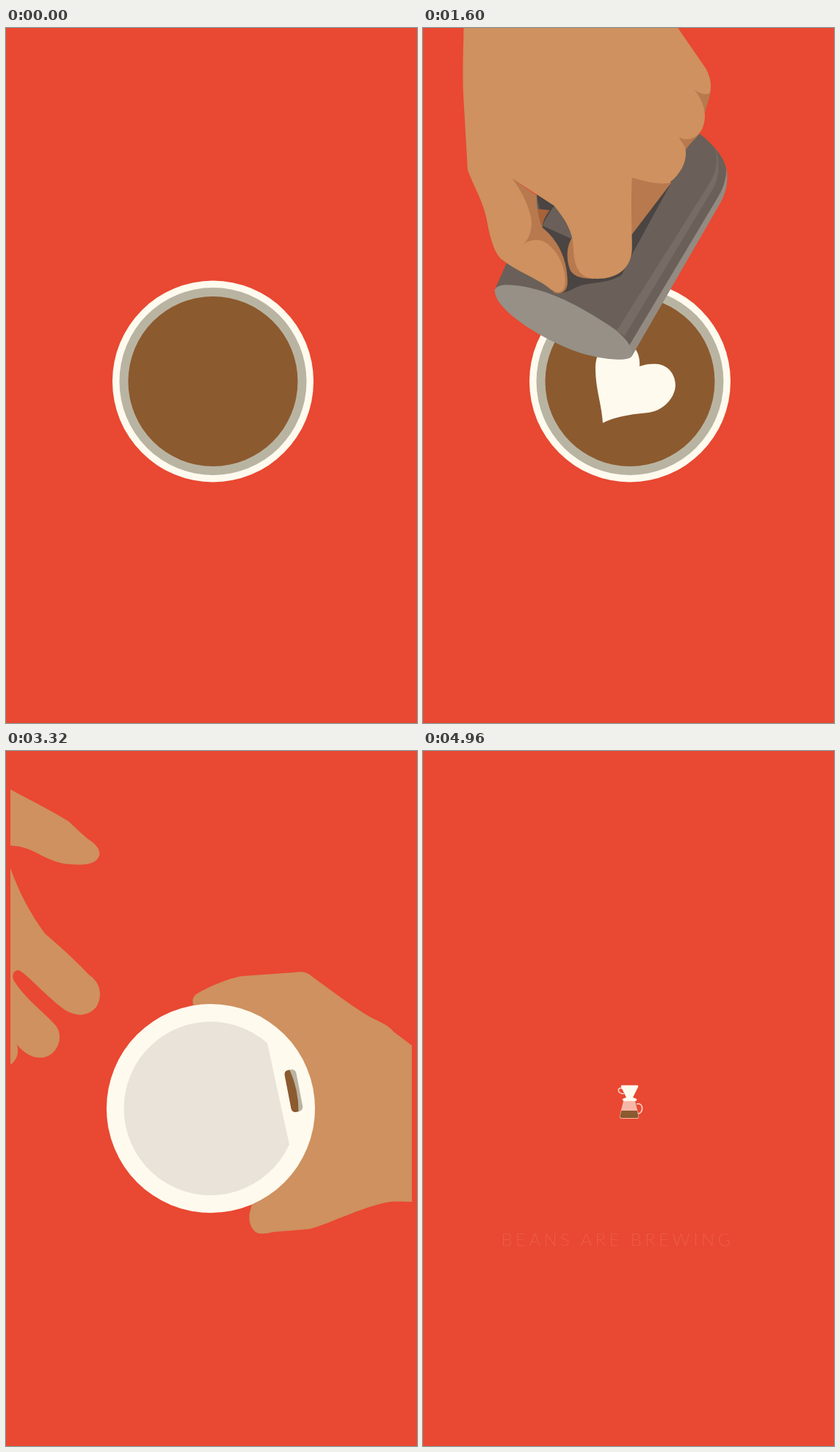
Write an HTML page that moves like this. It is 560 by 945 pixels and loops after 5000 ms.

```html
<!DOCTYPE html>
<html lang="en">
<head>
<meta charset="utf-8">
<title>Coffee loop</title>
<style>
html, body { margin: 0; width: 100%; height: 100%; overflow: hidden; background: #e94832; }
svg { display: block; width: 100%; height: 100%; }
.skin { fill: #ce915f; }
.shade { fill: #b7794d; }
.dark { fill: #4a4442; }
.steel { fill: #6a6059; }
.cream { fill: #fefaee; }
.coffee { fill: #8c5a2f; }
.ring { fill: #b9b4a2; }
</style>
</head>
<body>
<svg viewBox="0 0 560 945" preserveAspectRatio="none">
  <defs>
    <clipPath id="frame"><rect x="6" y="0" width="547" height="945"/></clipPath>
    <clipPath id="lip"><path id="lipShape" d="M227 358C231 349 250 351 268 354C310 362 350 385 385 408C405 422 416 437 414 448C411 455 385 455 350 446C320 437 280 418 250 393C235 380 226 368 227 358Z"/></clipPath>
  </defs>
  <rect width="560" height="945" fill="#e94832"/>

  <g id="cup">
    <circle class="cream" cx="282" cy="480.5" r="137"/>
    <circle class="ring" cx="282" cy="480.5" r="127.5"/>
    <circle class="coffee" cx="282" cy="480.5" r="115.5"/>
    <path id="milk" class="cream"/>
  </g>

  <g id="jug">
    <path class="steel" d="M227 358L243 322L285 228L400 190L506 146C530 165 546 185 543 208C542 222 537 234 530 246L414 448Z"/>
    <path fill="#766c65" d="M526 163C533 185 528 200 518 216L393 414L404 421L526 218C534 200 534 178 526 163Z"/>
    <path fill="#938b82" d="M543 192C542 212 537 222 530 234L409 436L414 448L531 246C543 227 545 212 543 192Z"/>
    <use href="#lipShape" fill="#969086"/>
    <path class="dark" d="M284 228L312 243L345 300L414 260L470 208L414 310L400 338C385 348 365 348 350 351C336 353 328 364 312 362L320 335L292 272Z"/>
    <path class="steel" d="M309 243L338 292L292 271C297 260 302 252 309 243Z"/>
    <path fill="#a8623a" d="M284 248L302 250C296 257 293 264 291 275Z"/>
    <path class="shade" d="M251 207L284 230C284 250 288 265 292 274C313 290 327 318 326 350C325 362 315 365 308 362L265 298Z"/>
    <path class="shade" d="M335 284C325 295 323 315 330 332C336 342 350 343 362 343L350 290Z"/>
    <path class="shade" d="M410 205C430 209 445 213 468 212L410 288Z"/>
    <path class="shade" d="M495 86L521 84C521 96 516 106 513 118L500 110Z"/>
    <path class="shade" d="M475 151L506 146C500 153 493 159 487 168Z"/>
    <path class="skin" d="M150 -700L184 -85C188 -50 182 40 184 90L190 195C198 218 212 238 217 268C222 295 229 312 238 318C255 332 285 343 300 355C310 364 323 366 323 345C322 320 308 300 293 292C284 289 272 290 265 298C273 290 278 278 277 265C275 245 262 222 251 207L308 244C322 262 334 280 334 300C335 325 340 340 360 343C396 345 414 328 414 300C414 280 412 240 414 206C425 208 445 216 465 213C480 200 489 185 487 168C486 162 481 157 478 151C486 155 496 155 505 146C512 140 514 125 513 118C512 105 505 94 499 86C508 93 515 93 520 91C523 80 521 70 515 58L475 0L414 -85L350 -180L340 -700Z"/>
    <g id="pourClip"><path id="pour" fill="#fdfbff"/></g>
  </g>

  <g id="hands">
    <g id="right">
      <path class="shade" d="M186 342C187 356 190 366 203 370L216 362Z"/>
      <path class="skin" d="M640 519L553 452L460 382C450 370 435 367 418 356C395 341 365 319 345 304C338 299 331 300 325 301L255 306C240 307 210 319 190 331C184 336 185 345 190 349C198 357 204 361 210 364L300 480L264 626C260 640 267 654 276 656C285 657 290 655 296 654L345 650C370 644 420 618 455 613C480 611 500 616 553 613L640 613Z"/>
    </g>
    <g id="lid">
      <circle class="cream" r="142"/>
      <path fill="#e9e3d9" d="M77 -89L107 49A118 118 0 1 1 77 -89Z"/>
      <g transform="translate(113 -24) rotate(-11)">
        <rect class="ring" x="-8" y="-29" width="16" height="58" rx="6"/>
        <path class="coffee" d="M0 -29Q7 0 1 29H-2Q-8 29 -8 23V-23Q-8 -29 -2 -29Z"/>
      </g>
    </g>
    <g id="left">
      <path class="skin" d="M-60 150L6 179C30 187 42 195 58 206C115 240 215 258 292 274C325 292 352 305 380 322C395 336 402 343 412 350C420 356 424 364 421 370C416 381 400 382 378 380C350 376 340 364 320 358C310 355 300 355 292 354C300 395 322 440 348 475C372 495 395 517 408 531C425 542 426 562 417 575C405 588 390 587 376 579C355 565 328 535 315 526C307 521 301 530 305 538C318 560 340 576 360 597C371 608 370 625 358 637C345 648 325 645 309 625C314 637 308 652 293 656C275 657 258 645 245 630C246 640 240 648 230 647C210 644 190 634 177 624C155 604 125 580 103 563C95 555 90 543 78 525C55 500 25 470 6 437L-60 340Z"/>
      <path class="shade" d="M163 559C185 568 200 580 211 595C195 588 178 574 163 559Z"/>
      <path class="shade" d="M232 564C245 562 255 567 262 574C272 585 282 597 293 609C275 596 252 578 232 564Z"/>
    </g>
  </g>

  <g id="brewer">
    <path d="M272 459C264 456 264 466 274 466M291 480C301 477 301 494 292 493" fill="none" stroke="#f9cfc0" stroke-width="1.7"/>
    <path class="cream" d="M271 454.500H292Q294 455 293 457L286 471L291 473Q292 476 289 476H274Q271 475 272 473L277 471L270 457Q269 455 271 454.500Z"/>
    <path fill="#f7b7a8" d="M273 476H289L294 496Q295 500 291 500H271Q267 500 268 496Z"/>
    <path class="coffee" d="M270.500 489H291.500L293.500 496Q294 499 291 499H271Q268 499 268.500 496Z"/>
  </g>
  <text id="label" x="106.500" y="673" font-family="Lato, 'Open Sans', sans-serif" font-weight="300" font-size="24" letter-spacing="4.4" fill="#ffd9d0">BEANS ARE BREWING</text>
</svg>
<script>
const LOOP = 5000, STEP = 40;
const $ = id => document.getElementById(id);
const mix = (a, b, p) => a + (b - a) * p;
const span = (t, a, b) => Math.min(1, Math.max(0, (t - a) / (b - a)));
const outCubic = p => 1 - (1 - p) ** 3;
const smooth = p => p * p * (3 - 2 * p);
const show = (id, on) => $(id).setAttribute('display', on ? 'inline' : 'none');
const place = (id, x, y, s = 1) => $(id).setAttribute('transform', `translate(${x} ${y}) scale(${s})`);

// heart outline: start point, then seven cubic segments
const heart = [245,537, 243,510, 235,490, 235,463, 235,440, 248,424, 266,424,
  284,424, 297,440, 295,460, 303,457, 312,456, 320,457, 335,459, 344,472, 344,486,
  343,505, 325,521, 307,523, 285,525, 262,528, 245,537];
const angles = [123, 193, 249, 300, 335, 372, 425, 483].map(a => a * Math.PI / 180);

// circle with the same segments as the heart
function disc(cx, cy, r) {
  const at = (a, k) => [cx + r * (Math.cos(a) - k * Math.sin(a)), cy + r * (Math.sin(a) + k * Math.cos(a))];
  const pts = at(angles[0], 0);
  for (let i = 1; i < angles.length; i++) {
    const a = angles[i - 1], b = angles[i], k = 4 / 3 * Math.tan((b - a) / 4);
    pts.push(...at(a, k), ...at(b, -k), ...at(b, 0));
  }
  return pts;
}

function drawMilk(t) {
  const r = t < 680 ? 37.5 * span(t, 480, 680) : mix(37.5, 54, smooth(span(t, 680, 1080)));
  const p = smooth(span(t, 980, 1360));
  const pts = disc(286, 475, r).map((v, i) => mix(v, heart[i], p));
  $('milk').setAttribute('d', `M${pts[0]} ${pts[1]}C${pts.slice(2).join(' ')}Z`);
  show('milk', r > 0);
}

function drawJug(t) {
  const on = t >= 40 && t < 2120;
  show('jug', on);
  if (!on) return;
  let x, y;
  if (t < 700) {
    x = 0;
    y = -460 * (1 - outCubic(span(t, 0, 560)));
  } else if (t < 900) {
    const p = smooth(span(t, 700, 900));
    x = 8 * p;
    y = -6 * p;
  } else if (t < 1280) {
    const p = span(t, 900, 1280) ** 2;
    x = mix(8, -50, p);
    y = mix(-6, 80, p);
  } else {
    const q = span(t, 1280, 2100) ** 2;
    x = -50 - 520 * q;
    y = 80 - 540 * q;
  }
  place('jug', x, y);

  const grow = span(t, 420, 540), left = 1 - span(t, 1280, 1400);
  const tip = [mix(336, 301, grow), mix(383, 448, grow)];
  const a = [mix(336, 305, left), mix(383, 367, left)];
  const b = [mix(336, 368, left), mix(383, 399.5, left)];
  $('pour').setAttribute('d', `M${a}L${b}L${tip}Z`);
  show('pour', grow > 0 && left > 0);
  if (t >= 1240) $('pourClip').setAttribute('clip-path', 'url(#lip)');
  else $('pourClip').removeAttribute('clip-path');
}

function drawHands(t) {
  show('hands', t >= 2440 && t < 4120);
  if (t >= 2880 && t < 3720) $('hands').setAttribute('clip-path', 'url(#frame)');
  else $('hands').removeAttribute('clip-path');

  const away = 1 - outCubic(span(t, 2400, 2920));
  const leave = span(t, 2960, 3400) ** 2;
  const hx = -440 * away - 440 * leave, hy = -270 * away - 338 * leave;
  show('left', t < 3400);
  place('left', hx, hy);

  // the cup is lifted towards the viewer and carried off
  const p = span(t, 3640, 4120);
  const s = 1 + .27 * p, dx = 490 * p * p, dy = -13 * p;
  const settle = smooth(span(t, 2960, 3160));
  place('lid', mix(276 - 440 * away, 279, settle) + dx, mix(484 - 270 * away, 486, settle) + dy, s);
  const enter = 400 * (1 - outCubic(span(t, 3160, 3520)));
  show('right', t > 3160);
  place('right', 279 * (1 - s) + dx + enter, 486 * (1 - s) + dy, s);
}

function drawBrewer(t) {
  const p = span(t, 4520, 4960), s = p * p;
  show('brewer', p > 0);
  place('brewer', 282 * (1 - s), 477 * (1 - s), s);
  $('label').setAttribute('opacity', .13 * p * p);
}

function draw(t) {
  show('cup', t < 3000);
  drawMilk(t);
  drawJug(t);
  drawHands(t);
  drawBrewer(t);
}

const start = performance.now();
function tick() {
  const t = (performance.now() - start) % LOOP;
  draw(Math.floor(t / STEP) * STEP);
  requestAnimationFrame(tick);
}
draw(0);
requestAnimationFrame(tick);
</script>
</body>
</html>
```
